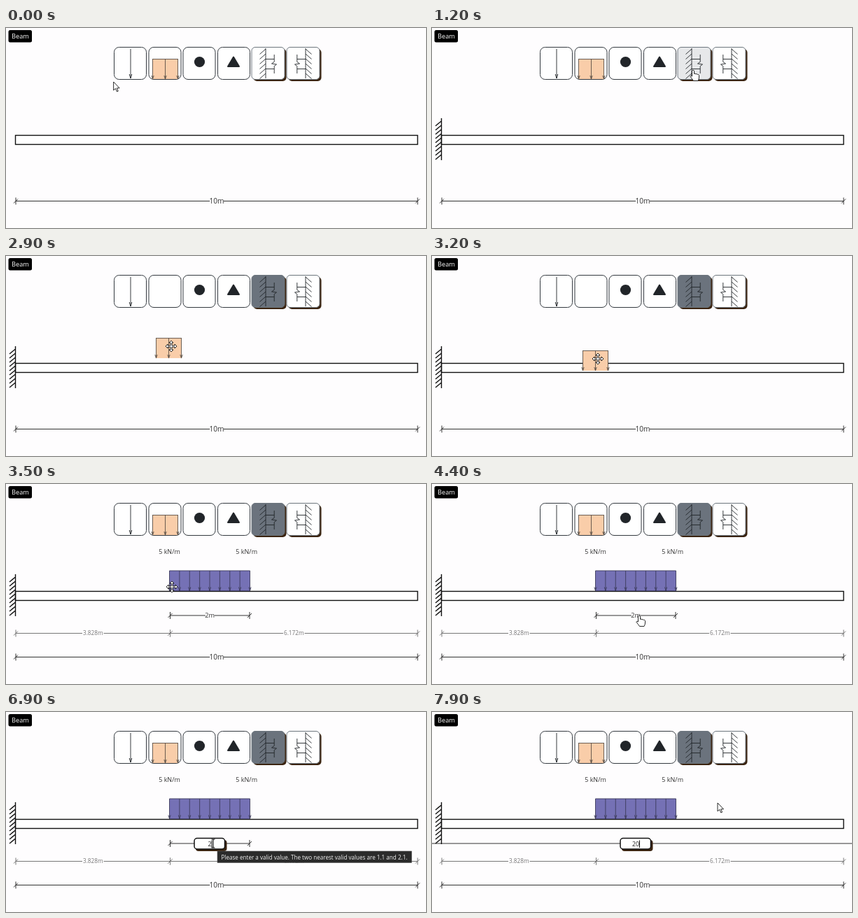
An HTML page that plays this animation: 600 by 286 pixels, repeating every 8 s.

```html
<!DOCTYPE html>
<html lang="en">
<head>
<meta charset="utf-8">
<title>Beam editor</title>
<style>
  html, body { margin: 0; width: 100%; height: 100%; overflow: hidden; background: #fefdfe; }
  svg { display: block; width: 100vw; height: 100vh; }
  text { font-family: "Open Sans", "Noto Sans", sans-serif; text-anchor: middle; }
</style>
</head>
<body>
<svg id="stage" viewBox="0 0 600 286"></svg>
<script>
const LOOP = 8000;
const PAPER = '#fefdfe', INK = '#212529', SHADOW = '#3b2410';

// Moments of the story, in ms
const T = { support: 1150, grab: 2550, drop: 3450, edit: 4800, tip: 5900, type: 7250 };

const line = (d, color = INK, width = 1) =>
  `<path d="${d}" fill="none" stroke="${color}" stroke-width="${width}"/>`;
const label = (x, y, size, str, color = '#333') =>
  `<text x="${x}" y="${y}" font-size="${size}" fill="${color}">${str}</text>`;
const box = (x, y, w, h, r, fill, stroke = 'none', width = 1, id = '') =>
  `<rect ${id && `id="${id}"`} x="${x}" y="${y}" width="${w}" height="${h}" rx="${r}" fill="${fill}" stroke="${stroke}" stroke-width="${width}"/>`;
const group = (id, body) => `<g id="${id}">${body}</g>`;
const range = n => [...Array(n).keys()];

const arrow = (x, top, bottom, head, half) =>
  `M${x} ${top}V${bottom}M${x - half} ${bottom - head}L${x} ${bottom}L${x + half} ${bottom - head}`;

function dimension(x1, x2, y, str, size, color, id = '') {
  const mid = (x1 + x2) / 2, gap = str.length * size * 0.29 + 1;
  const tick = x => `M${x} ${y - 5}V${y + 5}M${x - 3} ${y + 3}L${x + 3} ${y - 3}`;
  return group(id,
    line(`M${x1} ${y}H${x2}` + tick(x1) + tick(x2), color) +
    (str && box(mid - gap, y - 6, gap * 2, 12, 0, PAPER) + label(mid, y + size * 0.36, size, str, color)));
}

function hatches(x, top, count, step, w, h) {
  return range(count).map(i => `M${x} ${top + i * step}l${-w} ${h}`).join('');
}

function loadIcon() {
  const stems = [209.5, 227.5, 245.5].map(x => arrow(x, 44, 73, 5, 1.7)).join('');
  return box(209.5, 44.5, 36, 28.5, 0, '#f9cda9') + line('M209.5 44.5H245.5' + stems, '#5b5046', 0.9);
}

function fixedIcon() {
  return line('M371 29V72' + hatches(371, 30, 6, 7, 8.5, 7.5) +
    'M371 44.5H383M371 58.5H383M383.2 38V48.5L379.5 51L386.5 52L383.2 54.5V65', INK, 0.9);
}

function tool(x, raised, id) {
  return raised
    ? box(x + 2.5, 30, 47, 46, 5, SHADOW) + box(x, 27.5, 47, 46, 5, '#fff', '#6c757d', 1, id)
    : box(x, 27.5, 46, 46, 7, '#fff', '#343a40');
}

function load() {
  const step = 115 / 8;
  const stems = range(9).map(i => arrow(233.5 + i * step, 124, 152.5, 5, 1.6)).join('');
  return box(233.5, 124, 115, 29, 0, '#7571b5') + line('M233.5 124H348.5' + stems, '#3d3b5c', 0.9) +
    label(233.5, 99.5, 9, '5 kN/m') + label(343.7, 99.5, 9, '5 kN/m');
}

const cursors = {
  point: 'M0 0V12L2.8 9.5L4.8 14L6.6 13.2L4.7 8.9H8.5Z',
  hand: 'M-1.5 9V1.2Q0 -1 1.5 1.2V5.5Q3 4.3 4 6Q5.5 5 6.3 6.5Q8 6 8.5 7.5V11Q8.3 13.5 7 15.5H.5Q-1.5 12.5 -4 9.5Q-4 7.5 -1.5 9Z',
  move: 'M0 -8L3 -5H1V-1H5V-3L8 0L5 3V1H1V5H3L0 8L-3 5H-1V1H-5V3L-8 0L-5 -3V-1H-1V-5H-3Z',
  text: 'M-2.5 -6H-.8L0 -5.4L.8 -6H2.5M0 -5.4V5.4M-2.5 6H-.8L0 5.4L.8 6H2.5'
};

const stage = document.getElementById('stage');
stage.innerHTML =
  box(0, 0, 600, 286, 0, PAPER) +
  box(3.5, 3, 33.5, 17.5, 2.5, '#000') + label(20.5, 15, 9.2, 'Beam', '#fff') +
  [154.5, 204, 253, 302.5].map(x => tool(x)).join('') +
  tool(351, true, 'fixedButton') + tool(401, true, '') +
  line(arrow(178, 30, 72, 6, 1.8), INK, 0.9) +
  `<circle cx="276.5" cy="48.5" r="7.6" fill="${INK}"/>` +
  `<path d="M325 41.5L333 55H317Z" fill="${INK}" stroke="${INK}" stroke-width="2" stroke-linejoin="round"/>` +
  fixedIcon() + `<g transform="translate(799 0) scale(-1 1)">${fixedIcon()}</g>` +
  dimension(14, 588, 247.5, '10m', 10.2, '#333') +
  group('placed',
    load() +
    dimension(14, 234.5, 213.5, '3.828m', 8.2, '#777') +
    dimension(234.5, 588, 213.5, '6.172m', 8.2, '#777') +
    dimension(234.5, 348, 188, '2m', 9.2, '#333', 'span') +
    group('longSpan', line('M0 188H600', '#333'))) +
  box(13.5, 153.5, 574.5, 13, 0, '#fff', '#111', 1.4) +
  group('support', line('M13.5 129V189' + hatches(13.5, 133, 9, 6, 8.5, 7), '#111', 1.4)) +
  group('loadIcon', loadIcon()) +
  group('editor',
    box(271, 183, 44.5, 16, 4, SHADOW) + box(269, 180.5, 43.5, 15.5, 4, '#fff', '#111', 1.5) +
    `<text id="value" x="291" y="192" font-size="8.8" fill="#222"></text>` +
    `<path id="caret" d="M0 183.5V194" stroke="#111"/>`) +
  group('tip',
    box(302, 199, 277.5, 16.5, 0, '#2b2b2b', '#555', 0.6) +
    label(440.5, 210.5, 8.1, 'Please enter a valid value. The two nearest valid values are 1.1 and 2.1.', '#f4f4f4')) +
  `<path id="cursor" stroke="#111" stroke-linejoin="round"/>`;

const $ = id => document.getElementById(id);
const show = (id, on) => $(id).setAttribute('visibility', on ? 'inherit' : 'hidden');
const clamp = v => Math.min(1, Math.max(0, v));
const smooth = v => v * v * (3 - 2 * v);

// time, x, y of the pointer tip
const track = [
  [0, 153.5, 77], [250, 190, 79], [650, 318, 78], [1000, 373, 60], [1600, 373, 60],
  [2050, 298, 64], [2500, 231, 56], [2600, 231, 58], [2900, 236, 129], [3200, 237, 147],
  [3500, 237, 147], [3900, 268, 172], [4300, 296, 188], [7350, 296, 188], [7600, 360, 154], [7850, 408, 130]
];

function pointerAt(t) {
  const i = track.findIndex(k => k[0] > t);
  if (i < 0) return track[track.length - 1].slice(1);
  const [a, b] = [track[i - 1], track[i]];
  const f = (t - a[0]) / (b[0] - a[0]);
  return [a[1] + (b[1] - a[1]) * f, a[2] + (b[2] - a[2]) * f];
}

function cursorKind(t, x, y) {
  const over = (x1, y1, x2, y2) => x >= x1 && x <= x2 && y >= y1 && y <= y2;
  if (t >= T.grab && t < T.drop) return 'move';
  if (over(351, 27, 448, 74)) return 'hand';
  if (over(154, 27, 348, 74)) return 'move';
  if (t >= T.drop && over(233, 124, 348, 153)) return 'move';
  if (t >= T.drop && over(269, 180, 313, 197)) return t < T.edit ? 'hand' : 'text';
  return 'point';
}

function draw(t) {
  const [x, y] = pointerAt(t);
  const dragging = t >= T.grab && t < T.drop;
  const editing = t >= T.edit, typed = t >= T.type;

  const k = smooth(clamp((t - T.support) / 200));
  const mix = [107, 115, 125].map(c => Math.round(255 + (c - 255) * k));
  $('fixedButton').setAttribute('fill', `rgb(${mix})`);
  show('support', t >= T.support);

  $('loadIcon').setAttribute('transform', dragging ? `translate(${x - 231} ${y - 56})` : '');
  show('placed', t >= T.drop);
  show('span', t >= T.drop && !typed);
  show('longSpan', typed);

  show('editor', editing);
  $('value').textContent = typed ? '20' : '2';
  $('caret').setAttribute('transform', `translate(${typed ? 296.5 : 294} 0)`);
  show('caret', editing && Math.floor((t - T.edit) / 500) % 2 === 0);
  show('tip', t >= T.tip && !typed);

  const kind = cursorKind(t, x, y), cursor = $('cursor');
  cursor.setAttribute('d', cursors[kind]);
  cursor.setAttribute('fill', kind === 'text' ? 'none' : '#fff');
  cursor.setAttribute('stroke-width', kind === 'text' ? 1.1 : 0.9);
  cursor.setAttribute('transform', `translate(${x} ${y})`);
}

const start = performance.now();
function tick() {
  draw((performance.now() - start) % LOOP);
  requestAnimationFrame(tick);
}
tick();
</script>
</body>
</html>
```
